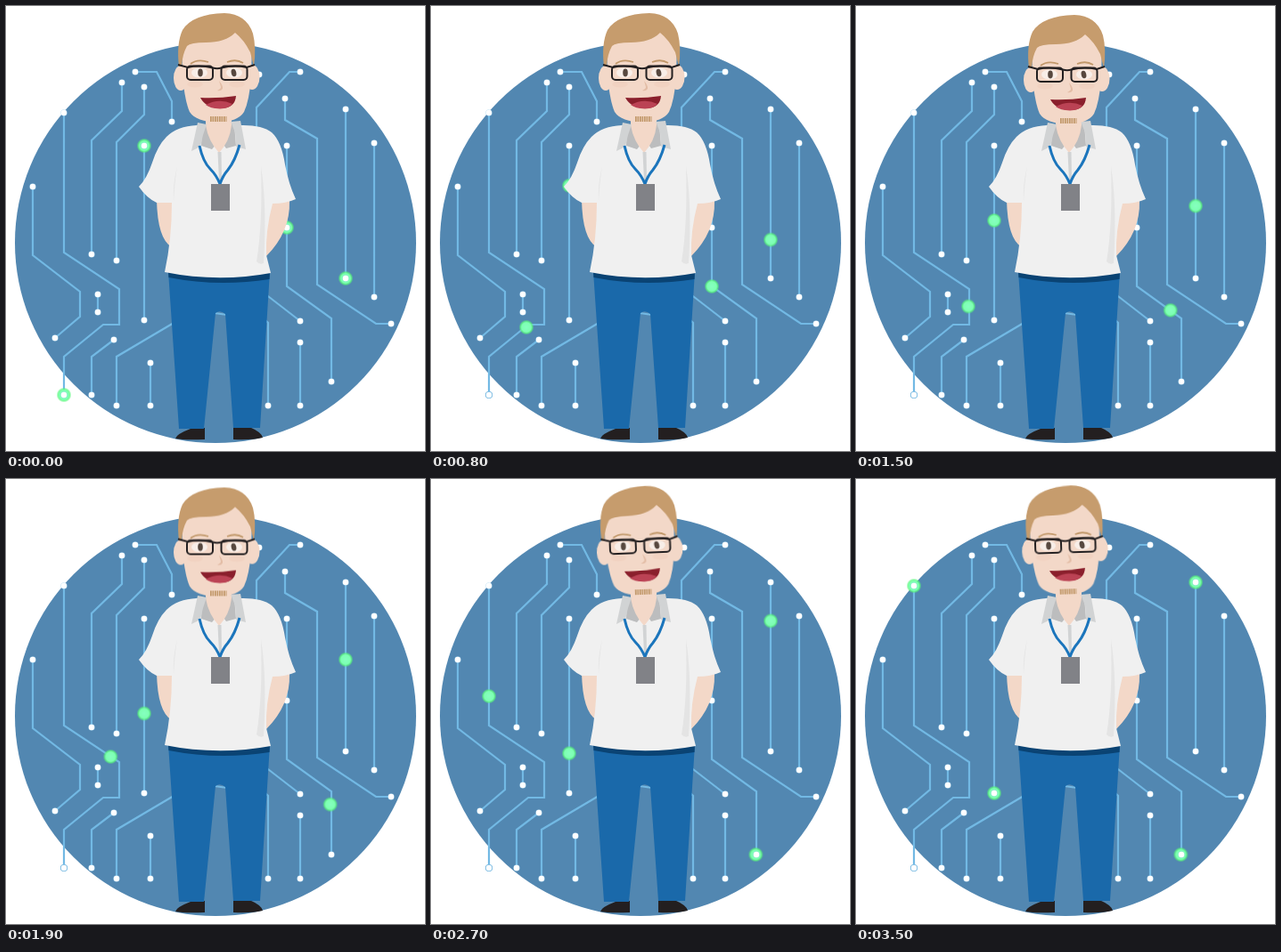
These frames come from a looping animation (470 by 500 pixels, 3600 ms). An HTML page without scripts:

```html
<!DOCTYPE html>
<html lang="en">
<head>
<meta charset="utf-8">
<title>Circuit guy</title>
<style>
html, body { margin: 0; width: 100%; height: 100%; overflow: hidden; background: #fff; }
svg { display: block; width: 100%; height: 100%; }

.lines { fill: none; stroke: #72b9e4; stroke-width: 2.2; }
.nodes { fill: none; stroke: #fff; stroke-width: 6.4; stroke-linecap: round; }
.halo { stroke: #a5d3ee; stroke-width: 7.6; }
.skin { fill: #f3d8c8; }
.hair { fill: #c69c6d; }
.ink { fill: #231f20; }
.shirt { fill: #f0f0f0; }

/* motion runs at ten poses per second */
.pulse, .head { animation: 3.6s -5ms infinite; }
.a { animation-name: down; }
.b { animation-name: up; }
.c { animation-name: right; }
.d { animation-name: left; }
.head { animation-name: nod; transform-origin: 237px 117px; }

@keyframes down {
  0% { transform: translate(155px, 157px); animation-timing-function: steps(35); }
  97.222%, 100% { transform: translate(155px, 353px); }
}
@keyframes up {
  0% { transform: translate(381px, 306px); animation-timing-function: steps(35); }
  97.222%, 100% { transform: translate(381px, 116px); }
}
@keyframes right {
  0% { transform: translate(315px, 249px); animation-timing-function: steps(8); }
  22.222% { transform: translate(315px, 315px); animation-timing-function: steps(9); }
  47.222% { transform: translate(363.5px, 349.5px); animation-timing-function: steps(9); }
  72.222%, 100% { transform: translate(364.3px, 422px); }
}
@keyframes left {
  0% { transform: translate(65px, 437px); animation-timing-function: steps(4); }
  11.111% { transform: translate(65px, 402px); animation-timing-function: steps(1); }
  13.889% { transform: translate(67px, 392px); animation-timing-function: steps(3); }
  22.222% { transform: translate(107px, 361px); animation-timing-function: steps(1); }
  25% { transform: translate(111px, 358px); animation-timing-function: steps(3); }
  33.333% { transform: translate(126px, 357px); animation-timing-function: steps(6); }
  50% { transform: translate(126px, 318px); animation-timing-function: steps(6); }
  66.667% { transform: translate(74px, 282px); animation-timing-function: steps(1); }
  69.444% { transform: translate(65px, 275px); animation-timing-function: steps(10); }
  97.222%, 100% { transform: translate(65px, 120px); }
}
@keyframes nod {
  0% { transform: none; animation-timing-function: steps(4); }
  11.111%, 13.889% { transform: translate(0, 0) rotate(6deg); animation-timing-function: steps(3); }
  22.222% { transform: translate(0, 0) rotate(0deg); animation-timing-function: steps(7); }
  41.667% { transform: translate(0, 2px) rotate(0deg); animation-timing-function: steps(8); }
  63.889% { transform: translate(0, 1px) rotate(0deg); animation-timing-function: steps(7); }
  83.333% { transform: translate(-1px, -.8px) rotate(-4deg); animation-timing-function: steps(5); }
  97.222%, 100% { transform: translate(-.6px, -.5px) rotate(-1.8deg); animation-timing-function: steps(1); }
}
</style>
</head>
<body>
<svg viewBox="0 0 470 500">
  <defs>
    <radialGradient id="glow">
      <stop offset="0" stop-color="#86ffc0"/>
      <stop offset=".62" stop-color="#7dffb2"/>
      <stop offset=".76" stop-color="#62fb86" stop-opacity=".85"/>
      <stop offset="1" stop-color="#50f070" stop-opacity="0"/>
    </radialGradient>
    <circle id="dot" r="8.5" fill="url(#glow)"/>
    <path id="ends" d="M145 74h0M186 130h0M130 86h0M96 279h0M155 91h0M124 286h0M65 120h0M65 437h0
      M30 203h0M55 373h0M155 157h0M155 353h0M103 324h0M103 344h0M121 375h0M96 437h0M124 449h0
      M162 401h0M162 449h0M330 74h0M284 77h0M313 104h0M432 357h0M381 116h0M381 306h0M413 154h0
      M413 327h0M315 157h0M315 249h0M365 422h0M330 354h0M330 378h0M330 449h0M294 449h0"/>
  </defs>

  <circle cx="235" cy="266" r="225" fill="#5287b1"/>

  <path class="lines" d="M145 74H169L186 107V130M130 86V118L96 151V279M155 91V122L124 153V286
    M65 120V277L127 318V358H109L65 394V437M30 203V280L83 321V349L55 373M155 157V353M103 324V344
    M121 375L96 394V437M124 449V394L200 349M162 401V449M330 74H318L281 114V140M284 77H265
    M313 104V128L349 149V313L415 357H432M381 116V306M413 154V327M315 157V315L365 351V422
    M330 354L290 323M330 378V449M294 449V356L286 348M234 345L248 347"/>

  <circle cx="65" cy="437" r="4.1" fill="#5ba9da"/>
  <use href="#dot" class="pulse a"/>
  <use href="#dot" class="pulse b"/>
  <use href="#dot" class="pulse c"/>
  <use href="#dot" class="pulse d"/>
  <use href="#ends" class="nodes halo" opacity=".55"/>
  <use href="#ends" class="nodes"/>

  <g class="body">
    <path class="ink" d="M190 486Q191 481 207 475L223 474V487Q200 488 190 486ZM255 474L273 473Q287 479 288 485Q275 488 255 487Z"/>
    <path fill="#1a69aa" d="M182 298L194 475H222L235 345Q240 341 246 346L255 474H285L296 298Z"/>
    <path fill="#0a4373" d="M182 298L182.500 305Q238 316 295.500 307L296 298Z"/>
    <path class="skin" d="M169 218Q170 262 186 271V218ZM297 218L318 219Q319 254 292 281L290 270Z"/>
    <path class="shirt" d="M214 134Q192 135 180 147Q170 157 164 176Q158 194 149 203Q158 216 169 221L186 221Q186 262 178 299Q238 311 297 300L292 280Q291 252 299 222Q314 222 325 217Q317 200 313 178Q309 152 298 142Q288 134 266 134Z"/>
    <path fill="#e4e4e4" d="M286 180Q293 225 289 289Q284 291 281 287Q288 245 286 180ZM192 180Q187 200 188 220Q189 198 192 180Z"/>
    <path fill="#bcbdbe" d="M220 135L219 157L231 161L240 150L247 160L258 157L256 133Z"/>
    <path class="skin" d="M224 118H253V134Q251 152 239 165Q227 152 224 134Z"/>
    <path fill="#d1d3d4" d="M215 131L225 133L221 145L218 158L208 163ZM252 130L263 129L269 161L258 158L257 142ZM237.500 164H241.500L242 196H239Z"/>
    <path fill="none" stroke="#1b75bc" stroke-width="3" d="M217 157Q221 175 229 183Q236 190 240 200Q243 191 249 184Q257 174 262 156"/>
    <rect x="230" y="200" width="21" height="30" fill="#818287"/>
  </g>

  <g class="head">
    <ellipse class="skin" cx="196" cy="81" rx="8" ry="14"/>
    <ellipse class="skin" cx="276" cy="80" rx="8.500" ry="14"/>
    <path class="skin" d="M197 40L198 80Q201 108 206 119Q213 130 238 131Q260 130 267 119Q273 106 275 80L276 40L240 18Z"/>
    <path class="hair" d="M194 68Q191 42 198 27Q209 9 245 8Q270 9 277 31Q281 47 278 68L274 52Q267 38 257 30Q246 41 224 41Q207 41 203 45Q198 54 197 67Z"/>
    <g fill="none" stroke="#c1986a" stroke-width="1.800">
      <path d="M207 65Q215 59 227 63M248 63Q258 59 266 64"/>
      <path d="M229 127H247.500" stroke-width="6" stroke-dasharray="1.700 .8"/>
    </g>
    <g fill="#efc9b6" opacity=".35">
      <ellipse cx="212" cy="88" rx="9" ry="3.500"/>
      <ellipse cx="259" cy="88" rx="9" ry="3.500"/>
    </g>
    <g fill="#f8eee8">
      <ellipse cx="217" cy="75" rx="9" ry="5.500"/>
      <ellipse cx="256" cy="75" rx="9" ry="5.500"/>
    </g>
    <g fill="#57483f">
      <ellipse cx="218" cy="75" rx="2.800" ry="4.400"/>
      <ellipse cx="255.500" cy="75" rx="2.800" ry="4.400" transform="rotate(-12 255.500 75)"/>
    </g>
    <path fill="#e3bda6" d="M239 84Q244 90 243 93Q241 96 237 95Q241 93 241 91Z"/>
    <g fill="none" stroke="#231f20" stroke-width="2">
      <rect x="203" y="67.500" width="29" height="15.500" rx="4"/>
      <rect x="241.500" y="67.500" width="29" height="15.500" rx="4"/>
      <path d="M193 66L204 69Q217 66 232 69.500Q237 71 241.500 69.500Q256 66 270 69L279 66"/>
    </g>
    <path fill="#8a1f2c" d="M218 103Q238 104 258 101Q257 114 243 115Q225 116 218 103Z"/>
    <path fill="#bb4254" d="M224 111Q239 103 254 110Q250 115 240 115.500Q229 115 224 111Z"/>
  </g>
</svg>
</body>
</html>
```
